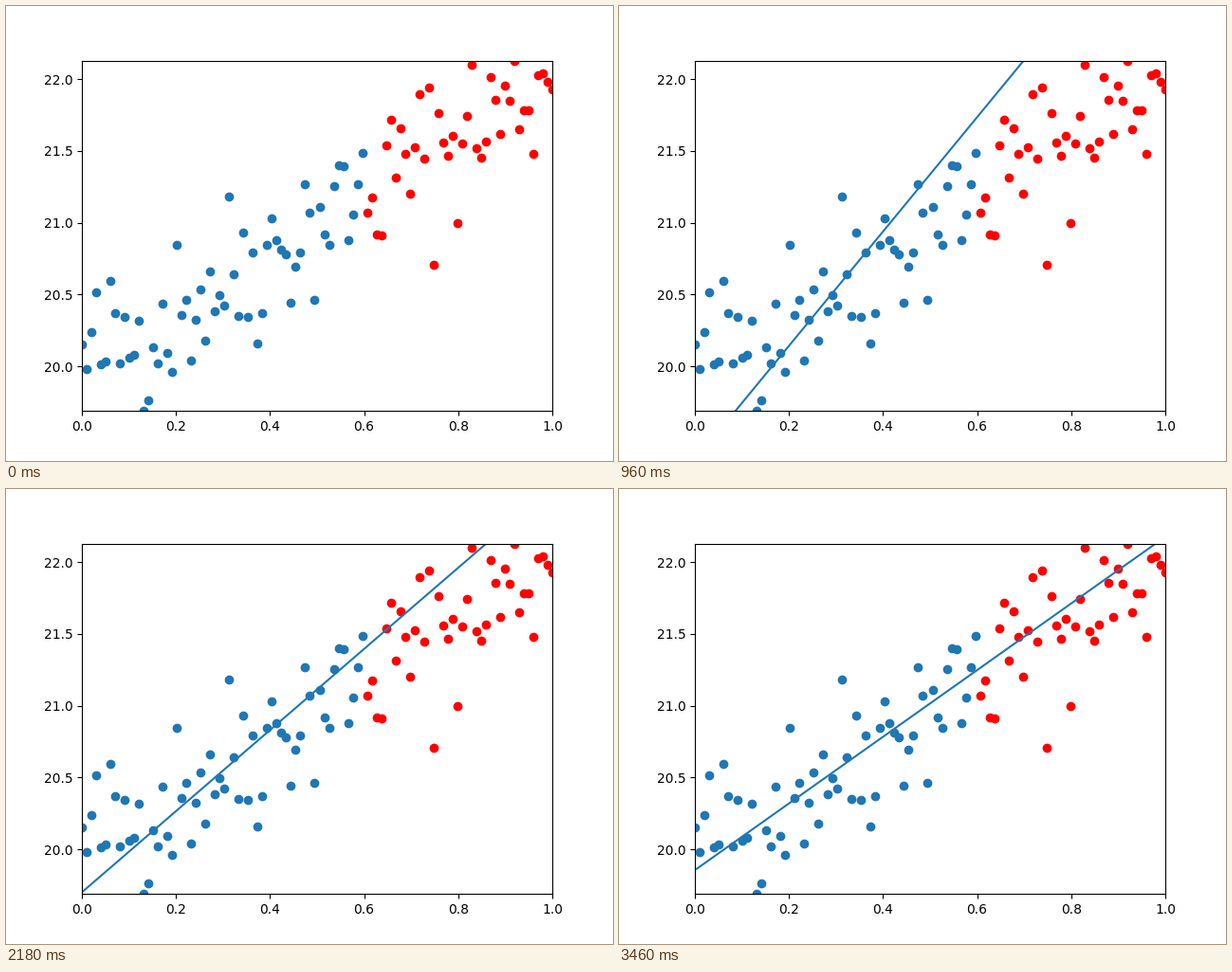
A matplotlib script that plays this animation: 640 px wide and 480 px high, repeating every 3.48 s.

```python
import numpy as np
import matplotlib.pyplot as plt
from matplotlib.animation import FuncAnimation

FRAMES, INTERVAL = 174, 20
N, N_TRAIN = 100, 60
RATE = 0.5
SKIP = 2  # first steps, while the line is still far below the view

np.random.seed(42)
x = np.linspace(0, 1, N)
y = 20 + 2 * x + 0.3 * np.random.randn(N)
x_train, y_train = x[:N_TRAIN], y[:N_TRAIN]


def descend(intercept, slope, steps):
    """Gradient descent of a straight line on the training samples."""
    path = []
    for _ in range(steps):
        path.append((intercept, slope))
        error = intercept + slope * x_train - y_train
        intercept -= RATE * error.mean()
        slope -= RATE * (error * x_train).mean()
    return path


path = descend(0.0, 0.3, FRAMES + SKIP)[SKIP:]

fig, ax = plt.subplots(figsize=(6.4, 4.8), dpi=100)
ax.scatter(x_train, y_train)
ax.scatter(x[N_TRAIN:], y[N_TRAIN:], color="red")
line, = ax.plot([], [], color="C0")
ax.set_xlim(0, 1)
ax.set_ylim(y.min(), y.max())


def update(i):
    intercept, slope = path[i]
    line.set_data([0, 1], [intercept, intercept + slope])
    return line,


anim = FuncAnimation(fig, update, frames=FRAMES, interval=INTERVAL,
                     repeat=True, repeat_delay=0)
plt.show()
```
